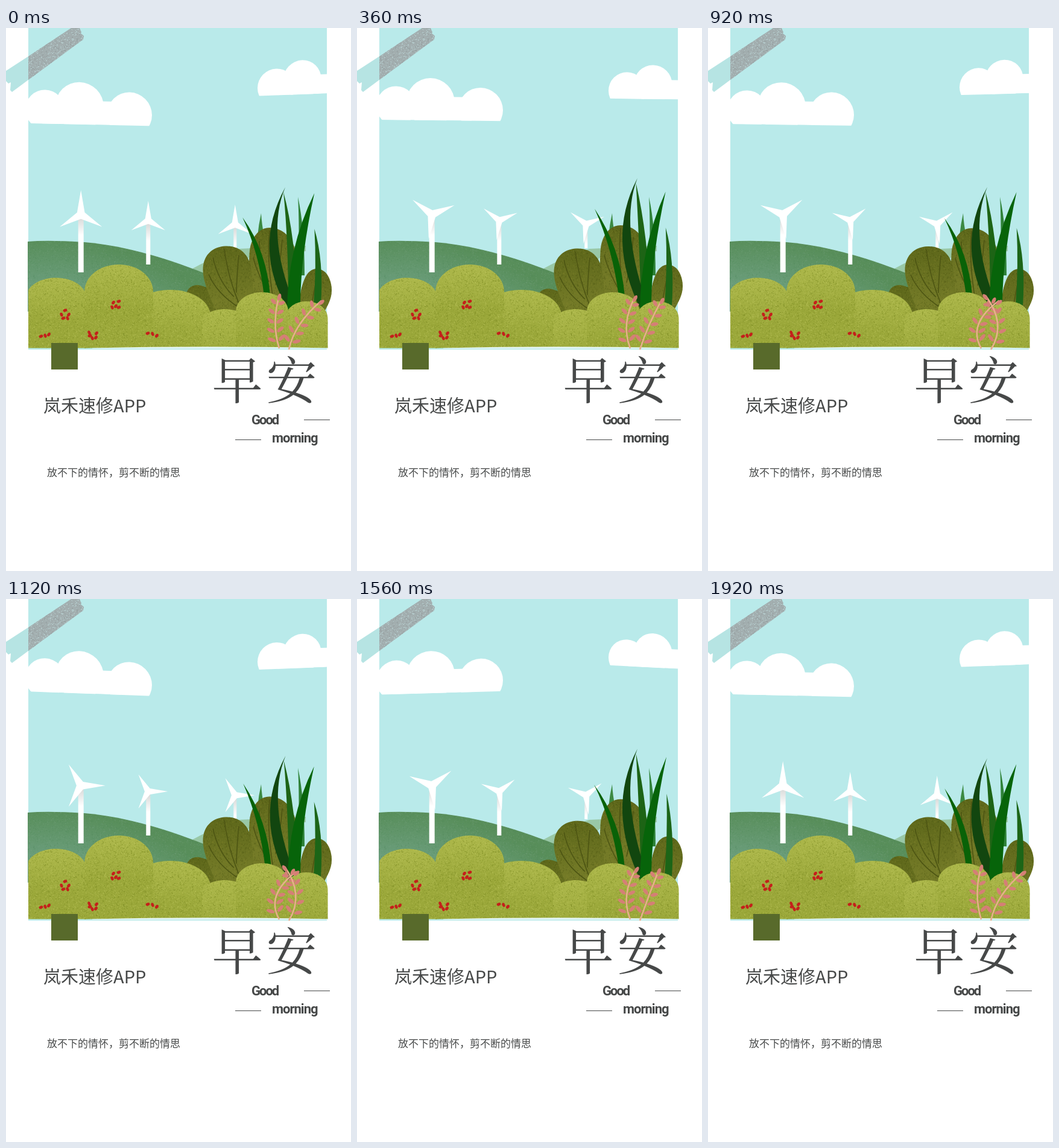
These frames come from a looping animation (572 by 900 pixels, 1960 ms). An HTML page with a canvas:

```html
<!DOCTYPE html>
<html lang="zh-CN">
<head>
<meta charset="utf-8">
<title>早安</title>
<style>
  html, body { margin: 0; width: 572px; height: 900px; overflow: hidden; background: #fff; }
  canvas, svg { position: absolute; left: 0; top: 0; }
  text { fill: #464848; font-family: "Noto Sans CJK SC", "Noto Sans CJK", sans-serif; }
  .big { font: 300 84px "Noto Serif CJK SC", "Noto Sans CJK SC", "Noto Sans CJK", serif; text-anchor: middle; }
  .en { font: bold 22px Roboto, "Liberation Sans", sans-serif; }
</style>
</head>
<body>
<canvas id="stage" width="572" height="900"></canvas>
<svg width="572" height="900">
  <rect x="75" y="522" width="44" height="44" fill="#586a2b"/>
  <text class="big" x="383.5" y="615">早</text>
  <text class="big" x="473.5" y="615">安</text>
  <text class="en" x="407" y="657" letter-spacing="-2">Good</text>
  <text class="en" x="441" y="687" letter-spacing="-1">morning</text>
  <path d="M494 649.5h43M380 682.5h43" stroke="#464848"/>
  <text x="62" y="637" font-size="29">岚禾速修APP</text>
  <text x="68" y="743" font-size="17">放不下的情怀，剪不断的情思</text>
</svg>
<script>
const ctx = document.getElementById('stage').getContext('2d');
const LOOP = 1960, STEP = 40, TURN = 1920, SWAY = 960, TAU = Math.PI * 2;
const SKY = '#b9eaea';

let seed = 7;
const random = () => (seed = seed * 16807 % 2147483647) / 2147483647;

function grain(count, ...colors) {
  const tile = document.createElement('canvas');
  tile.width = tile.height = 160;
  const c = tile.getContext('2d');
  for (let i = 0; i < count; i++) {
    c.fillStyle = colors[i % colors.length];
    c.fillRect(random() * 160 | 0, random() * 160 | 0, 1 + random() * 2 | 0, 1 + random() * 2 | 0);
  }
  return ctx.createPattern(tile, 'repeat');
}
const leafGrain = grain(5200, 'rgba(118,132,28,.25)', 'rgba(190,200,95,.25)');
const oliveGrain = grain(4000, 'rgba(66,76,10,.22)', 'rgba(134,136,48,.2)');
const hillGrain = grain(3500, 'rgba(72,130,80,.15)', 'rgba(125,170,140,.15)');
const tapeGrain = grain(4500, '#9aa5a6', '#b0c4c5');

function fade(y0, y1, from, to) {
  const g = ctx.createLinearGradient(0, y0, 0, y1);
  g.addColorStop(0, from);
  g.addColorStop(1, to);
  return g;
}

const hillShade = ctx.createRadialGradient(60, 800, 360, 60, 800, 450);
hillShade.addColorStop(0, '#6ea081');
hillShade.addColorStop(1, '#588e5a');

function fill(d, ...paints) {
  const path = new Path2D(d);
  for (const p of paints) {
    ctx.fillStyle = p;
    ctx.fill(path);
  }
}

function stroke(d, color, width) {
  ctx.strokeStyle = color;
  ctx.lineWidth = width;
  ctx.stroke(new Path2D(d));
}

function ellipse(x, y, rx, ry, angle, color) {
  ctx.fillStyle = color;
  ctx.beginPath();
  ctx.ellipse(x, y, rx, ry, angle, 0, TAU);
  ctx.fill();
}

// The flat base runs from (x0, y0) to (x1, y1); lobes are given relative to it.
function cloud(x0, y0, x1, y1, lobes, [rx, ry, rw]) {
  const slope = (y1 - y0) / (x1 - x0);
  ctx.save();
  ctx.transform(1, slope, 0, 1, 0, y0 - slope * x0);
  ctx.beginPath();
  ctx.rect(x0 - 8, -120, 240, 120);
  ctx.clip();
  for (const [x, y, r] of lobes) ellipse(x, y, r, r, 0, '#fff');
  ctx.fillRect(rx, ry, rw, -ry);
  ctx.restore();
}

function turbine(x, y, length, width, bottom, angle) {
  ctx.fillStyle = fade(y + 8, y + 34, '#dcdedd', '#fff');
  ctx.fillRect(x - width / 2, y, width, bottom - y);
  ctx.fillStyle = '#fff';
  ctx.beginPath();
  for (let i = 0; i < 6; i++) {
    const a = angle - TAU / 4 + i * TAU / 6, r = i % 2 ? length * .18 : length;
    ctx.lineTo(x + r * Math.cos(a), y + r * Math.sin(a));
  }
  ctx.fill();
}

const blade = (color, tip, c1, b1, b2, c2) =>
  fill(`M${tip}Q${c1} ${b1}L${b2}Q${c2} ${tip}Z`, color);

function dome(x0, x1, top, side) {
  const m = (x0 + x1) / 2, w = (x1 - x0) * .22, k = side - (side - top) * .58;
  fill(`M${x0} 531V${side}C${x0} ${k} ${m - w * 1.25} ${top} ${m} ${top}S${x1} ${k} ${x1} ${side}V531Z`,
    fade(top, top + 75, '#adb84b', '#9ba83a'), leafGrain);
}

function fern(base, ctrl, tip) {
  const at = (s, i) => (1 - s) ** 2 * base[i] + 2 * s * (1 - s) * ctrl[i] + s * s * tip[i];
  stroke(`M${base}Q${ctrl} ${tip}`, '#e8ad8c', 2.6);
  for (let i = 0; i < 5; i++) {
    const s = .13 + i * .175, x = at(s, 0), y = at(s, 1);
    const dir = Math.atan2(at(s + .05, 1) - y, at(s + .05, 0) - x);
    for (const side of [-1, 1]) {
      const a = dir + side, r = 10 - i * .5;
      ellipse(x + r * Math.cos(a), y + r * Math.sin(a), 7 - i * .3, 3, a, '#d57f76');
    }
  }
  const end = Math.atan2(tip[1] - ctrl[1], tip[0] - ctrl[0]);
  ellipse(tip[0], tip[1] + 3, 6, 3, end, '#d57f76');
}

const berries = [
  [98, 468], [92, 475], [104, 475], [95, 481], [102, 481],
  [178, 455], [187, 453], [176, 463], [182, 461], [187, 463],
  [138, 505], [150, 506], [139, 510], [143, 514], [149, 513],
  [58, 511], [65, 510], [71, 508], [235, 506], [243, 507], [250, 510]
];

const swing = p => (mid, amp, phase) => mid + amp * Math.cos(TAU * (p - phase));

function scenery(wave, angle) {
  ctx.fillStyle = SKY;
  ctx.fillRect(37, 0, 495, 533);
  cloud(37, wave(156.4, -4.8, .3), 237, wave(157.2, -5.2, .53),
    [[65, -23, 33], [122, -30, 40], [205, -18, 37]], [60, -39, 130]);
  cloud(421, wave(113, 5, .27), 532, wave(113.5, 5.5, .44),
    [[448, -13, 31], [491, -25, 31.5]], [450, -32, 82]);

  // Tape over the corner
  fill('M0 71L37 47V86L10 106L7 103L8 90L4 92L0 88Z', '#b6e4e3');
  fill('M37 47L108 0H122L125 7L124 9L129 13L128 19L37 86Z', '#a3afb0', tapeGrain);

  fill('M300 404Q345 378 385 366L497 361V370L410 374L360 420L300 412Z', 'rgba(146,192,150,.8)');
  fill('M36 354Q70 351 130 355C200 361 272 383 340 411L345 470H36Z', hillShade, hillGrain);

  turbine(124.2, 309.3, 40.5, 9, 405, angle);
  turbine(235.8, 319, 32.5, 7, 392, angle);
  turbine(379.8, 325.2, 32.5, 5, 365, angle);
}

function shrubs(wave) {
  const olive = (top, dy, d, veins) => {
    ctx.save();
    ctx.translate(0, dy);
    fill(d, fade(top, top + 90, '#5d671a', '#737a27'), oliveGrain);
    if (veins) stroke(veins, '#4d5513', 1.6);
    ctx.restore();
  };
  const sway = wave(3.5, -3.5, 0);

  blade('#3c8a42', [423, 307], [419, 325], [417, 345], [428, 345], [424, 325]);
  olive(330, wave(0, -3.6, .29),
    'M402 476C403 430 402 390 404 368C407 345 420 330 437 330C460 330 475 348 480 368L492 476Z',
    'M437 335Q432 390 445 460M420 352Q420 385 436 420M458 350Q455 390 447 425M410 380Q418 410 436 440');
  olive(426, wave(3.5, -3.6, 0), 'M299 440Q303 426 318 426Q336 428 352 445L356 474H320Z');
  olive(361, wave(3.5, -3.5, .08),
    'M352 476C335 440 322 410 328 388C334 368 350 361 366 361C392 361 406 380 407 405L414 476Z',
    'M362 366Q368 415 390 465M343 380Q352 420 378 445M386 376Q383 405 382 438M336 408Q350 440 385 462');
  olive(399, wave(-3.6, 3.8, .96),
    'M484 476C488 420 498 399 516 399C532 400 540 418 540 435C540 450 533 460 525 476Z',
    'M518 404Q510 435 506 465');

  const lean = wave(-8, -8.3, .38), rise = wave(-9, -9, .51), reach = wave(-6.5, -8, .66);
  blade('#2f8238', [484, 280], [487, 330], [484, 410], [495, 410], [495, 330]);
  blade('#096207', [392 - lean / 8, 316 + lean], [420 + sway * .7, 375 + lean / 2], [428 + sway, 445],
    [438 + sway, 445], [433 + sway * .7, 372 + lean / 2]);
  blade('#1d6415', [460 - rise / 6, 272 + rise], [468, 350], [468 + sway / 2, 462],
    [483 + sway / 2, 457], [480 + sway / 2, 345]);
  blade('#12460f', [463 - rise / 8, 264 + rise], [408 + sway * .7, 365 + rise], [468 + sway / 2, 468],
    [477 + sway / 2, 455], [431 + sway * .7, 340 + rise]);
  blade('#07640a', [511 - reach / 7, 276 + reach], [466 + sway / 2, 366], [466 + sway / 2, 470],
    [488, 454], [489, 375]);
  blade('#1c6517', [511 - reach / 6, 335 + reach * .85], [515, 395], [510, 460], [522, 460], [527, 385]);
}

function front(angle) {
  ctx.save();
  ctx.beginPath();
  ctx.rect(37, 380, 497, 150.5);
  ctx.clip();
  dome(206, 339, 434, 478);
  dome(33, 133, 414, 448);
  dome(130, 244, 392, 438);
  dome(325, 400, 466, 488);
  dome(463, 533.5, 453, 482);
  dome(381, 468, 438, 470);
  ctx.restore();
  fill('M143 530.5Q330 526 533 530.5V531.5H143Z', '#e3f6f5');
  berries.forEach(([x, y], i) => ellipse(x, y, 3.5, 2.4, [-.4, 1.2, 2.2][i % 3], '#c4201b'));

  const c = Math.cos(angle - .09), dip = 4.5 * (1 - c);
  const leftTip = 468 - 15 * c, rightTip = 491 + 32 * c;
  fern([453, 531], [440 - .35 * (leftTip - 453), 490], [leftTip, 443 + dip]);
  fern([469, 533], [478 + .28 * (523 - rightTip), 490], [rightTip, 452 - dip]);
}

let start;
function frame(now) {
  start ??= now;
  const t = Math.floor((now - start) % LOOP / STEP) * STEP;
  const wave = swing(t / SWAY), angle = t / TURN * TAU;
  ctx.clearRect(0, 0, 572, 900);
  scenery(wave, angle);
  shrubs(wave);
  front(angle);
  requestAnimationFrame(frame);
}
requestAnimationFrame(frame);
</script>
</body>
</html>
```
